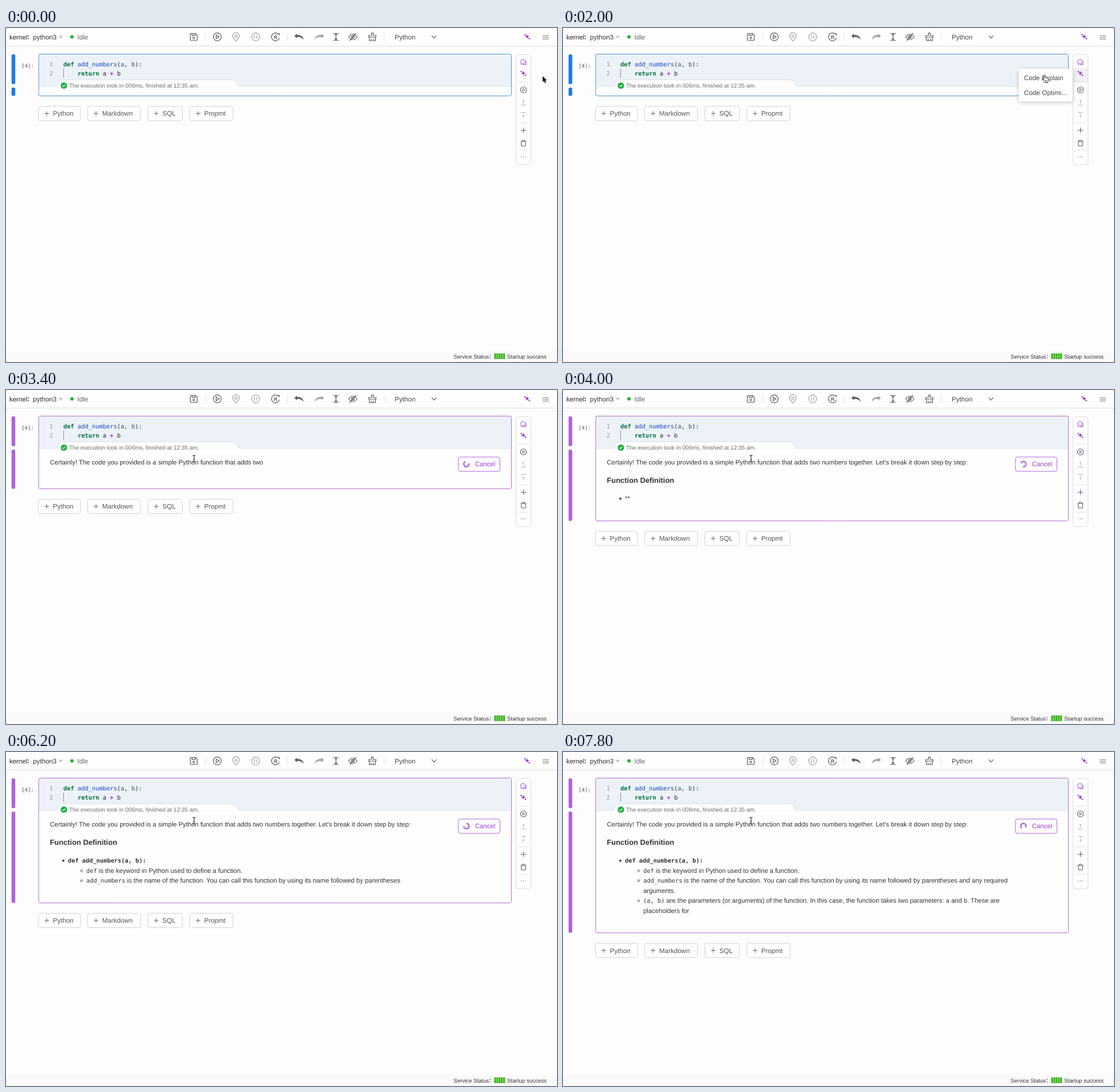
An HTML page with a canvas for the animation above (8000 ms loop, 961x583 px).

```html
<!DOCTYPE html>
<html lang="en">
<head>
<meta charset="utf-8">
<title>Notebook code explanation</title>
<style>
html, body { margin: 0; width: 100%; height: 100%; overflow: hidden; background: #fdfdfd; }
canvas { display: block; width: 961px; height: 583px; }
</style>
</head>
<body>
<canvas id="stage" width="961" height="583"></canvas>
<script>
const ctx = document.getElementById('stage').getContext('2d');
const LOOP = 8000, STEP = 200;
const SANS = '"Liberation Sans", Arial, sans-serif';
const MONO = '"DejaVu Sans Mono", monospace';
const BLUE = '#1a7cf0', PURPLE = '#b062dc', VIOLET = '#a336d6', INK = '#5a5a5a', PALE = '#a2a2a2', SLATE = '#5c5c78';

const FONT = {
  body: `11.25px ${SANS}`,
  tight: `11.2px ${SANS}`,
  head: `bold 12.9px ${SANS}`,
  code: `10.3px ${MONO}`,
  strong: `bold 10.3px ${MONO}`,
  ui: `11.6px ${SANS}`,
  edit: `10.4px ${MONO}`,
  editBold: `bold 10.4px ${MONO}`
};

// Streamed answer: position, bullet kind and styled runs of each row
const ROWS = [
  { x: 76.5, y: 129.5, end: 172.5, runs: [['body', "Certainly! The code you provided is a simple Python function that adds two numbers together. Let's break it down step by step:"]] },
  { x: 76.5, y: 162, end: 196.5, runs: [['head', 'Function Definition']] },
  { x: 108, dot: 'disc', runs: [['strong', 'def add_numbers(a, b):']] },
  { x: 140, dot: 'ring', runs: [['code', 'def'], ['body', ' is the keyword in Python used to define a function.']] },
  { x: 140, dot: 'ring', runs: [['code', 'add_numbers'], ['body', ' is the name of the function. You can call this function by using its name followed by parentheses and any required']] },
  { x: 140, runs: [['body', 'arguments.']] },
  { x: 140, dot: 'ring', runs: [['code', '(a, b)'], ['tight', ' are the parameters (or arguments) of the function. In this case, the function takes two parameters: '], ['code', 'a'], ['tight', ' and '], ['code', 'b'], ['tight', '. These are']] },
  { x: 140, runs: [['body', 'placeholders for']] }
];
let total = 0;
ROWS.forEach((row, i) => {
  row.text = row.runs.map(r => r[1]).join('');
  row.start = total;
  total += row.text.length;
  if (i > 1) {
    row.y = 193.4 + 17.45 * (i - 2);
    row.end = 228.5 + 17.45 * (i - 2);
  }
});
const calls = ROWS[4];
const TYPING = [
  [2800, 0],
  [4000, ROWS[2].start + 1],
  [5200, calls.start],
  [6200, calls.start + calls.text.indexOf(' and any')],
  [7800, total]
];
const POINTER = [
  [0, 936, 84], [400, 936, 84], [1000, 904.5, 81.5], [1400, 904.5, 81.5],
  [1800, 840, 82], [2200, 840, 82], [2600, 328, 120]
];

const ease = k => k * k * (3 - 2 * k);

function track(keys, t, curve = k => k) {
  if (t <= keys[0][0]) return keys[0].slice(1);
  for (let i = 1; i < keys.length; i++) {
    const [a, b] = [keys[i - 1], keys[i]];
    if (t <= b[0]) {
      const k = curve((t - a[0]) / (b[0] - a[0]));
      return a.slice(1).map((v, j) => v + (b[j + 1] - v) * k);
    }
  }
  return keys[keys.length - 1].slice(1);
}

function text(s, x, y, color, font = FONT.ui) {
  ctx.font = font;
  ctx.fillStyle = color;
  ctx.fillText(s, x, y);
  return x + ctx.measureText(s).width;
}

function path(d, x, y, { stroke, fill, w = 1.2, flip = 1, size = 1 }) {
  const p = new Path2D(d);
  ctx.save();
  ctx.translate(x, y);
  ctx.scale(flip * size, size);
  ctx.lineWidth = w;
  if (fill) { ctx.fillStyle = fill; ctx.fill(p); }
  if (stroke) { ctx.strokeStyle = stroke; ctx.stroke(p); }
  ctx.restore();
}

function rect(x, y, w, h, color) {
  ctx.fillStyle = color;
  ctx.fillRect(x, y, w, h);
}

function box(x, y, w, h, r, fill, stroke) {
  ctx.beginPath();
  ctx.roundRect(x, y, w, h, r);
  if (fill) { ctx.fillStyle = fill; ctx.fill(); }
  if (stroke) { ctx.strokeStyle = stroke; ctx.lineWidth = 1; ctx.stroke(); }
}

function disc(x, y, r, color) {
  ctx.beginPath();
  ctx.arc(x, y, r, 0, 7);
  ctx.fillStyle = color;
  ctx.fill();
}

function arc(x, y, r, color, w = 1.2, from = 0, to = Math.PI * 2) {
  ctx.beginPath();
  ctx.arc(x, y, r, from, to);
  ctx.strokeStyle = color;
  ctx.lineWidth = w;
  ctx.stroke();
}

const plus = (x, y, r, color) => path(`M${-r} 0H${r}M0 ${-r}V${r}`, x, y, { stroke: color, w: 1 });

function sparkle(x, y) {
  const star = 'M0-4Q.7-.7 4 0Q.7 .7 0 4Q-.7 .7-4 0Q-.7-.7 0-4Z';
  path(star, x, y, { fill: VIOLET });
  path(star, x - 3.5, y - 3, { fill: VIOLET, size: .5 });
  path(star, x + 3.5, y + 3.4, { fill: VIOLET, size: .5 });
}

function toolbar() {
  rect(0, 0, 961, 31, '#fefefe');
  rect(0, 31, 961, 1, '#dfdfdf');
  text('kernel', 6, 19.5, '#222', `11.4px ${SANS}`);
  disc(38.7, 14, .9, '#222');
  disc(38.7, 18.5, .9, '#222');
  text('python3', 47, 19.5, '#333');
  path('M-4-2.2H4L0 2.5Z', 95.5, 16, { fill: '#c4c4c4' });
  disc(115, 15.5, 3, '#25b32c');
  text('Idle', 124.5, 19.5, '#666');

  const dark = { stroke: INK };
  path('M-6-5a1 1 0 0 1 1-1H3L6-3V5a1 1 0 0 1-1 1H-5a1 1 0 0 1-1-1ZM-3-6V-2.6H2.5V-6', 327.5, 15.5, dark);
  arc(327.5, 17.5, 1.6, INK, 1.1);
  [348, 490, 659].forEach(x => rect(x, 9, 1, 14, '#e2e2e2'));
  arc(368.5, 15.5, 6.9, INK);
  path('M-2-3.2L3.2 0L-2 3.2Z', 368.5, 15.5, dark);
  path('M0 7.3C-4 3-6 1-6-1.5A6 5.8 0 0 1 6-1.5C6 1 4 3 0 7.3Z', 401, 15.5, { stroke: PALE });
  arc(401, 14, 2, PALE);
  arc(435.5, 15.5, 6.9, PALE);
  path('M-2-3V3M2-3V3', 435.5, 15.5, { stroke: PALE });
  arc(470, 15.5, 6.9, INK, 1.2, .25, 5.6);
  path('M4-5.6H6.8V-2.8', 470, 15.5, dark);
  text('R', 467.2, 18.8, INK, `bold 8.6px ${SANS}`);
  const bend = 'M-8-1.8L-3.4-5.6V-3.2C3-3.6 7-1 8 5C5 1 1.5-.4-3.4 0V2.4Z';
  path(bend, 511, 15.5, { fill: INK });
  path(bend, 546.5, 15.5, { fill: PALE, flip: -1 });
  path('M-5-6H5M-5 6H5M0-4V4M-2-3L0-5L2-3M-2 3L0 5L2 3', 575.5, 15.5, dark);
  path('M-7.3 0Q0-9.5 7.3 0Q0 9.5-7.3 0ZM5.5-6.5L-5.5 6.5', 605, 15.5, dark);
  arc(605, 15.5, 2.3, INK);
  path('M-1.5-6.7H1.5V-2.5H6.3V.5H-6.3V-2.5H-1.5ZM-5.3 .5V6.5H5.3V.5M-2 3.5V6.5M2 3.5V6.5', 639, 15.5, dark);
  text('Python', 678, 19.5, '#444');
  path('M-4-2L0 2.4L4-2', 746.5, 15.2, { stroke: '#555', w: 1.1 });
  sparkle(909, 15);
  for (let i = 0; i < 12; i++) rect(936.5 + i % 4 * 2.7, 12.6 + Math.floor(i / 4) * 3, 1.6, 1.5, '#666');
}

function cell(bottom, active) {
  const bar = active ? PURPLE : BLUE;
  box(9.7, 46, 6.4, 52, 2.5, bar);
  box(9.7, 104, 6.4, bottom - 104, 2.5, bar);
  text('[4]:', 27.3, 68.5, '#4a5068', `8.8px ${MONO}`);

  const edge = active ? '#b26cd4' : '#4a96d6';
  box(57, 45.5, 824.5, bottom - 45.5, 3, '#fefefe');
  box(57, 45.5, 824.5, 56.5, [3, 3, 0, 0], '#ecf2f7');
  rect(57, 101.5, 824.5, 1, '#d9e1e8');
  path('M86 102.5C92 101 90 90.5 98 90.5H394C403 90.5 402 100 409 102.5Z', 0, 0, { fill: '#fefefe' });
  path('M86 102C92 101 90 90.5 98 90.5H394C403 90.5 402 100 409 102', 0, 0, { stroke: '#d9e1e8', w: 1 });
  box(57, 45.5, 824.5, bottom - 45.5, 3, null, edge);

  text('1', 75.7, 67, '#999', FONT.edit);
  text('2', 75.7, 83, '#999', FONT.edit);
  const code = (y, x, runs) => runs.forEach(([s, color, bold]) => {
    x = text(s, x, y, color, bold ? FONT.editBold : FONT.edit);
  });
  code(67, 100, [['def', '#00713f', 1], [' add_numbers', '#1446cc'], ['(', '#333'], ['a', '#35506a'], [', ', '#333'], ['b', '#35506a'], ['):', '#333']]);
  code(83, 125, [['return', '#00713f', 1], [' a ', '#222'], ['+', '#a01fd6', 1], [' b', '#222']]);
  rect(100, 71, 1, 16, '#8a8f94');

  disc(101, 100.5, 5.6, '#1fb141');
  path('M-2.4 0L-.7 1.8L2.5-1.7', 101, 100.5, { stroke: '#fff', w: 1.2 });
  text('The execution took in 006ms, finished at 12:35 am.', 110, 104, '#707070', `10.03px ${SANS}`);
}

function addButtons(y) {
  [['Python', 56.5, 73.5], ['Markdown', 142.5, 92], ['SQL', 247.5, 60], ['Propmt', 320.5, 75.5]].forEach(([name, x, w]) => {
    box(x, y - 12.5, w, 25, 3.5, '#fefefe', '#d2d2d2');
    plus(x + 14.5, y, 4, '#666');
    text(name, x + 25.2, y + 4.2, '#555');
  });
}

function sidePanel(hover) {
  box(889.5, 46.5, 26, 192, 3, '#fefefe', '#dedede');
  if (hover) rect(890, 70, 25, 24, '#f0f0f0');
  [94, 165, 213].forEach(y => rect(893, y, 19, 1, '#e2e2e2'));
  path('M-4.3 3.6L-3.8 1.8A4 4 0 1 1-1.2 3.4ZM3.6-2.2A3.6 3.6 0 0 1 4.4 2.6L4.8 4.7L2.8 4.1A4 4 0 0 1-.8 3.6', 902.3, 59.5, { stroke: VIOLET, w: 1 });
  sparkle(902.3, 79);
  arc(902.5, 108, 5.2, SLATE, 1.1);
  path('M-1.4-2.3L2.4 0L-1.4 2.3Z', 902.5, 108, { stroke: SLATE, w: 1 });
  const jump = 'M-4.5 4.5H4.5M0 2.2V-4M-1.8-2.2L0-4L1.8-2.2';
  path(jump, 902.5, 130, { stroke: '#b0b0b6', w: 1 });
  ctx.save();
  ctx.translate(902.5, 152);
  ctx.rotate(Math.PI);
  path(jump, 0, 0, { stroke: '#b0b0b6', w: 1 });
  ctx.restore();
  plus(902.5, 178.5, 4.7, SLATE);
  path('M-5-3H5M-2-3V-5H2V-3M-3.7-3V4A1 1 0 0 0-2.7 5H2.7A1 1 0 0 0 3.7 4V-3', 902.5, 201, { stroke: SLATE, w: 1.1 });
  [-3.7, 0, 3.7].forEach(dx => disc(902.5 + dx, 225, .8, '#777'));
}

function menu() {
  ctx.save();
  ctx.shadowColor = 'rgba(0,0,0,.2)';
  ctx.shadowBlur = 9;
  ctx.shadowOffsetY = 2;
  box(795, 71, 94, 57, 3, '#fff');
  ctx.restore();
  text('Code Explain', 804, 91, '#444', `11.5px ${SANS}`);
  text('Code Optimi...', 804, 116.5, '#444', `11.75px ${SANS}`);
}

function cancel(t) {
  box(789, 117, 72.5, 25, 3.5, '#fefefe', PURPLE);
  const gap = ((t - 2600) * .36 + 8) * Math.PI / 180;
  arc(803, 129.3, 4.6, PURPLE, 2.3, gap + .82, gap + Math.PI * 2 - .82);
  text('Cancel', 818, 133.3, VIOLET, `11.35px ${SANS}`);
}

function answer(n) {
  ROWS.forEach((row, i) => {
    let left = Math.min(n - row.start, row.text.length);
    if (left <= 0) return;
    if (row.dot === 'disc') disc(100, row.y - 3.8, 1.9, '#333');
    if (row.dot === 'ring') arc(131.7, row.y - 3.5, 1.8, '#444', .9);
    if (i === 2 && left <= 2) return text('**', row.x, row.y, '#333', FONT.body);
    // whole words appear at once
    while (left < row.text.length && row.text[left] !== ' ') {
      if (row.text[left - 1] === ' ') break;
      left++;
    }
    let x = row.x;
    for (const [style, s] of row.runs) {
      x = text(s.slice(0, Math.max(0, left)), x, row.y, '#333', FONT[style]);
      left -= s.length;
    }
  });
}

function footer() {
  rect(0, 563, 961, 20, '#fafafa');
  text('Service Status', 780.5, 576.5, '#333', `9.6px ${SANS}`);
  disc(844.6, 571.5, .8, '#333');
  disc(844.6, 575.7, .8, '#333');
  for (let i = 0; i < 5; i++) rect(851.5 + i * 3.9, 568, 3.2, 10, '#3cb41c');
  text('Startup success', 874, 576.5, '#333', `9.7px ${SANS}`);
}

function pointer(t) {
  const [x, y] = track(POINTER, t, ease);
  if (t >= 3000) {
    const beam = 'M-2.6-6Q-.3-6 0-5Q.3-6 2.6-6M0-5V5M-2.6 6Q-.3 6 0 5Q.3 6 2.6 6M-1.3 1.8H1.3';
    path(beam, 328, 120, { stroke: '#fff', w: 2.2 });
    path(beam, 328, 120, { stroke: '#222', w: 1.1 });
  } else if (t >= 1000 && t < 2400) {
    path('M-1.3 .8Q0-.8 1.3 .8V4.6Q2.6 3.8 3.3 5Q4.6 4.4 5.1 5.7Q6.4 5.4 6.5 7V9.4Q6.3 11 5.4 12V13.4H-.2V12.4Q-2.2 10.6-3.6 7.7Q-3.4 6.1-1.3 8ZM1.4 9V11.5M3.2 9V11.5', x, y, { fill: '#fff', stroke: '#222', w: 1 });
  } else {
    path('M0 0V10.4L2.3 8.3L4 12.3L5.8 11.5L4.1 7.6H7.4Z', x, y, { stroke: '#fff', w: 1.8, fill: '#000' });
    path('M0 0V10.4L2.3 8.3L4 12.3L5.8 11.5L4.1 7.6H7.4Z', x, y, { fill: '#000' });
  }
}

function draw(t) {
  const active = t >= 2200;
  const open = t >= 1000 && !active;
  const n = Math.round(track(TYPING, t)[0]);
  let bottom = active ? 172.5 : 118.5;
  for (const row of ROWS) if (n > row.start) bottom = row.end;

  rect(0, 0, 961, 583, '#fdfdfd');
  toolbar();
  cell(bottom, active);
  addButtons(bottom + 30.7);
  sidePanel(open);
  if (active) {
    answer(n);
    cancel(t);
  }
  if (open) menu();
  footer();
  pointer(t);
}

ctx.textRendering = 'geometricPrecision';
const began = performance.now();
function tick() {
  const t = (performance.now() - began) % LOOP;
  draw(Math.floor(t / STEP) * STEP);
  requestAnimationFrame(tick);
}
tick();
</script>
</body>
</html>
```
